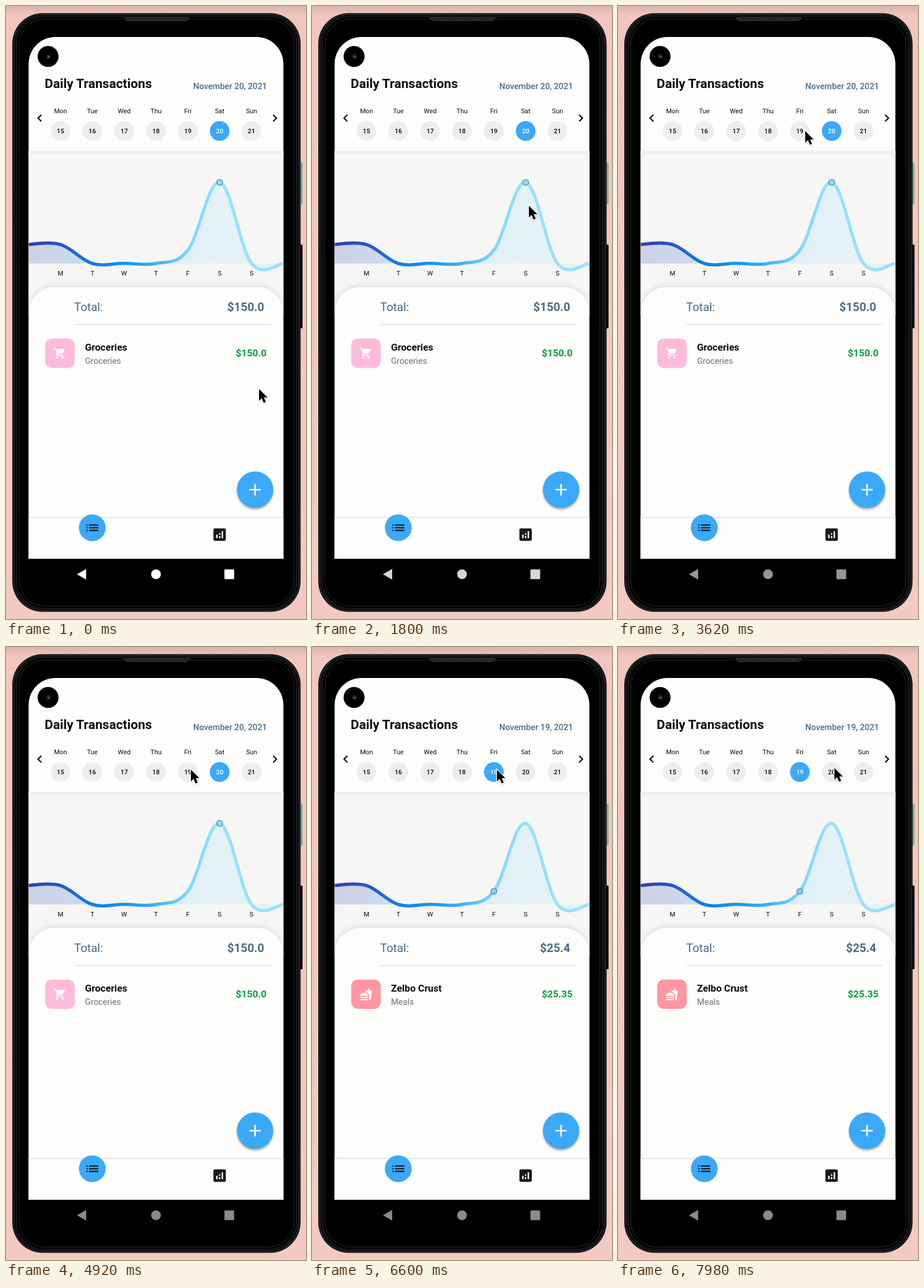
Write an HTML page that moves like this. It is 524 by 1069 pixels and loops after 8 s.

```html
<!DOCTYPE html>
<html lang="en">
<head>
<meta charset="utf-8">
<title>Daily Transactions</title>
<style>
  html, body { margin: 0; width: 100%; height: 100%; overflow: hidden; background: #f1c8bf; }
  svg { display: block; width: 524px; height: 1069px; }
  text { font-family: Roboto, Arial, sans-serif; fill: #0c0c0c; }
  .mid { text-anchor: middle; }
  .end { text-anchor: end; }
  .med { font-weight: 500; }
  .bold { font-weight: 700; }
  .small { font-size: 11.35px; }
  .body { font-size: 14.75px; }
  .item { font-size: 17px; }
  .total { font-size: 20.4px; }
  .slate { fill: #4b6e84; }
</style>
</head>
<body>
<svg viewBox="0 0 524 1069">
  <defs>
    <linearGradient id="wall" x2="0" y2="1">
      <stop offset="0" stop-color="#dab5ad"/>
      <stop offset=".016" stop-color="#f0c6bd"/>
      <stop offset="1" stop-color="#f2cac2"/>
    </linearGradient>
    <linearGradient id="line" gradientUnits="userSpaceOnUse" x1="39.6" x2="484.4">
      <stop offset="0" stop-color="#2b3fb0"/>
      <stop offset=".12" stop-color="#2a54c4"/>
      <stop offset=".25" stop-color="#0f80dd"/>
      <stop offset=".37" stop-color="#1193f7"/>
      <stop offset=".5" stop-color="#3cb0fb"/>
      <stop offset=".63" stop-color="#82d8fd"/>
      <stop offset=".75" stop-color="#98e1fd"/>
      <stop offset="1" stop-color="#98e1fd"/>
    </linearGradient>
    <clipPath id="screen">
      <path d="M39.5 964V101a47 47 0 0 1 47-47h351a47 47 0 0 1 47 47V964z"/>
    </clipPath>
    <filter id="soft" x="-20%" y="-20%" width="140%" height="140%">
      <feGaussianBlur stdDeviation="5"/>
    </filter>
    <filter id="near" x="-30%" y="-30%" width="160%" height="160%">
      <feGaussianBlur stdDeviation="2"/>
    </filter>
  </defs>

  <rect width="524" height="1069" fill="url(#wall)"/>

  <!-- phone -->
  <rect x="512" y="273" width="6" height="73" rx="1.5" fill="#82ad95"/>
  <rect x="512" y="416" width="6" height="146" rx="1.5" fill="#101114"/>
  <rect x="11" y="12.5" width="503.5" height="1044" rx="53" fill="#08090b"/>
  <rect x="13.5" y="14.5" width="498.5" height="1040" rx="51" fill="none" stroke="#24262c" stroke-width="2"/>
  <rect x="18" y="18" width="489.5" height="1033" rx="48" fill="#000" stroke="#15161a" stroke-width="3"/>
  <rect x="22.5" y="22.5" width="480.5" height="1024" rx="45" fill="#000" stroke="#292b31" stroke-width="1"/>
  <path d="M206 20.5h114l-4 5h-106z" fill="#17181b" stroke="#45464a" stroke-width="1"/>
  <path d="M212 23h102" stroke="#36373a" stroke-width="2" stroke-dasharray="2 2"/>

  <g clip-path="url(#screen)">
    <rect x="39" y="54" width="446" height="911" fill="#fdfdfc"/>
    <rect x="39" y="253" width="446" height="285" fill="#f6f6f5"/>
    <rect x="39" y="252.5" width="446" height="5" fill="#efefef"/>
    <path id="area" fill="url(#line)" opacity=".2"/>
    <path id="curve" fill="none" stroke="url(#line)" stroke-width="5.6"/>
    <circle id="dot" r="5.2" stroke="#4a7687" stroke-width="1.1"/>
    <rect x="39.5" y="487" width="445" height="500" rx="45.4" fill="#000" opacity=".09" filter="url(#soft)"/>
    <rect x="39.5" y="490" width="445" height="520" rx="45.4" fill="#fdfdfc"/>
    <rect x="39" y="890.5" width="446" height="3" fill="#ebebeb"/>
    <rect x="39" y="893.5" width="446" height="72" fill="#fdfdfc"/>
  </g>

  <circle cx="73.5" cy="88" r="18.3"/>
  <circle cx="74" cy="88" r="4.3" fill="#2d1a1c"/>
  <circle cx="74.5" cy="88.5" r="1.6" fill="#8b5558"/>

  <!-- header -->
  <text x="67.5" y="143.3" class="bold" font-size="22.6">Daily Transactions</text>
  <text id="date" x="456" y="144.5" class="end med body slate"></text>
  <path id="prev" transform="translate(45.6 182.3) scale(1.1)" d="M15.41 7.41 14 6l-6 6 6 6 1.41-1.41L10.83 12z"/>
  <path transform="translate(482.8 182.3) scale(-1.1 1.1)" d="M15.41 7.41 14 6l-6 6 6 6 1.41-1.41L10.83 12z"/>
  <g id="week"></g>

  <!-- list -->
  <text x="119" y="532" class="total slate">Total:</text>
  <text id="total" x="451" y="532" class="end bold total slate"></text>
  <path d="M119 555.5H462.5" stroke="#dedede" stroke-width="1.4"/>
  <rect id="tile" x="68.5" y="580" width="51.5" height="51" rx="11.5"/>
  <path id="icon" transform="translate(82.7 594.2) scale(.946)" fill="#fff"/>
  <text id="name" x="138" y="601" class="bold item"></text>
  <text id="kind" x="138" y="623.7" class="body" style="fill:#707070"></text>
  <text id="cost" x="455" y="611.3" class="end bold item" style="fill:#0ca03f"></text>

  <!-- add button and tabs -->
  <circle cx="435" cy="846.5" r="31" opacity=".38" filter="url(#near)"/>
  <circle cx="435" cy="843.5" r="31.8" fill="#3ba9f8"/>
  <path d="M425 843.5h20m-10-10v20" stroke="#fff" stroke-width="2.7"/>
  <circle cx="150.7" cy="909.8" r="23.4" fill="#3ba9f8"/>
  <path transform="translate(136.7 895.8) scale(1.17)" fill="#14202a"
    d="M3 13h2v-2H3zm0 4h2v-2H3zm0-8h2V7H3zm4 4h14v-2H7zm0 4h14v-2H7zM7 7v2h14V7z"/>
  <g transform="translate(358.7 907.5) scale(1.2)">
    <rect x="3" y="3" width="18" height="18" rx="2" fill="#1b1b1b"/>
    <path d="M7 12h2v5H7zm8-5h2v10h-2zm-4 7h2v3h-2zm0-4h2v2h-2z" fill="#fff"/>
  </g>

  <!-- system keys -->
  <g id="keys">
    <path d="M124 991l16-9.2v18.4z"/>
    <circle cx="262" cy="991" r="8.5"/>
    <rect x="381.5" y="982.5" width="17" height="17" rx="1.5"/>
  </g>

  <g id="cursor">
    <path d="M0 0v20.5l4.7-4.4 3.4 8 3.8-1.6-3.4-7.8h6.3z" transform="translate(1 2)" opacity=".3" filter="url(#near)"/>
    <path d="M0 0v20.5l4.7-4.4 3.4 8 3.8-1.6-3.4-7.8h6.3z" stroke="#fff" stroke-width="2.4" paint-order="stroke"/>
  </g>
</svg>

<script>
const LOOP = 8000, PICK = 5400;
const LEFT = 39.6, STEP = 55.6, BASE = 449;
const BLUE = '#3ba9f8';
const $ = id => document.getElementById(id);
const dayX = i => LEFT + STEP * (i + 1);

const CART = 'M7 18c-1.1 0-1.99.9-1.99 2S5.9 22 7 22s2-.9 2-2-.9-2-2-2zM1 2v2h2l3.6 7.59-1.35 2.45c-.16.28-.25.61-.25.96 0 1.1.9 2 2 2h12v-2H7.42c-.14 0-.25-.11-.25-.25l.03-.12.9-1.63h7.45c.75 0 1.41-.41 1.75-1.03l3.58-6.49c.08-.14.12-.31.12-.48 0-.55-.45-1-1-1H5.21l-.94-2zm16 16c-1.1 0-1.99.9-1.99 2s.89 2 1.99 2 2-.9 2-2-.9-2-2-2z';
const MEAL = 'M18.06 22.99h1.66c.84 0 1.53-.64 1.63-1.46L23 5.05h-5V1h-1.97v4.05h-4.97l.3 2.34c1.71.47 3.31 1.32 4.27 2.26 1.44 1.42 2.43 2.89 2.43 5.29zM1 21.99V21h15.03v.99c0 .55-.45 1-1.01 1H2.01c-.56 0-1.01-.45-1.01-1zM16.03 14.99c0-8-15.03-8-15.03 0zM1.02 17h15v2h-15z';

const SATURDAY = { day: 5, total: '$150.0', cost: '$150.0', name: 'Groceries', kind: 'Groceries',
  icon: CART, tile: '#fdbbdb', dot: '#92dbf8' };
const FRIDAY = { day: 4, total: '$25.4', cost: '$25.35', name: 'Zelbo Crust', kind: 'Meals',
  icon: MEAL, tile: '#fe979f', dot: '#7fcff6' };

// [time, x, y] of the pointer tip
const POINTER = [[0, 442, 668], [1000, 442, 668], [2150, 361, 258], [2450, 361, 258],
  [3620, 327, 218], [3900, 323, 214], [6800, 323, 214], [7850, 378, 211], [LOOP, 378, 211]];
// [time, grey level] of the system keys
const DIM = [[0, 255], [960, 246], [2400, 193], [3620, 151], [4600, 138], [LOOP, 138]];

function sample(table, t, ease = p => p) {
  const i = Math.max(1, table.findIndex(row => row[0] >= t));
  const a = table[i - 1], b = table[i];
  const p = ease((t - a[0]) / (b[0] - a[0]));
  return a.slice(1).map((v, k) => v + (b[k + 1] - v) * p);
}
const smooth = p => p * p * (3 - 2 * p);

function add(parent, tag, attrs, text = '') {
  const el = document.createElementNS('http://www.w3.org/2000/svg', tag);
  for (const k in attrs) el.setAttribute(k, attrs[k]);
  el.textContent = text;
  return parent.appendChild(el);
}

// Smoothed line through one value per day, padded at both edges
const levels = [416, 416, BASE, 448.7, BASE, 426, 307.5, BASE, BASE];
function curvePath() {
  const pts = levels.map((y, i) => [LEFT + STEP * i, y]);
  let d = 'M' + pts[0], pull = [0, 0];
  for (let i = 1; i < pts.length; i++) {
    const prev = pts[i - 1], cur = pts[i], next = pts[i + 1] || cur;
    const nextPull = [0, 1].map(k => (next[k] - prev[k]) / 2 * 0.35);
    d += `C${prev[0] + pull[0]} ${prev[1] + pull[1]} ${cur[0] - nextPull[0]} ${cur[1] - nextPull[1]} ${cur}`;
    pull = nextPull;
  }
  return d;
}
const path = curvePath();
$('curve').setAttribute('d', path);
$('area').setAttribute('d', `${path}V${BASE}H${LEFT}z`);

const days = ['Mon', 'Tue', 'Wed', 'Thu', 'Fri', 'Sat', 'Sun'].map((label, i) => {
  const x = dayX(i), week = $('week');
  add(week, 'text', { x, y: 186.6, class: 'mid small' }, label);
  add(week, 'text', { x, y: 469.6, class: 'mid small' }, label[0]);
  return {
    disc: add(week, 'circle', { cx: x, cy: 218, r: 17.2 }),
    num: add(week, 'text', { x, y: 221.8, class: 'mid med small' }, 15 + i)
  };
});

let shown;
function select(item) {
  if (item === shown) return;
  shown = item;
  days.forEach(({ disc, num }, i) => {
    const on = i === item.day;
    disc.setAttribute('fill', on ? BLUE : '#eeeeed');
    num.style.fill = on ? '#fff' : '#0c0c0c';
  });
  $('date').textContent = `November ${15 + item.day}, 2021`;
  for (const id of ['total', 'cost', 'name', 'kind']) $(id).textContent = item[id];
  $('icon').setAttribute('d', item.icon);
  $('tile').setAttribute('fill', item.tile);
  $('dot').setAttribute('fill', item.dot);
  $('dot').setAttribute('cx', dayX(item.day));
  $('dot').setAttribute('cy', levels[item.day + 1]);
}

function draw(t) {
  select(t < PICK ? SATURDAY : FRIDAY);
  const [grey] = sample(DIM, t);
  $('keys').setAttribute('fill', `rgb(${grey},${grey},${grey})`);
  $('cursor').setAttribute('transform', `translate(${sample(POINTER, t, smooth)})`);
}

const start = performance.now();
function tick() {
  draw((performance.now() - start) % LOOP);
  requestAnimationFrame(tick);
}
tick();
</script>
</body>
</html>
```
